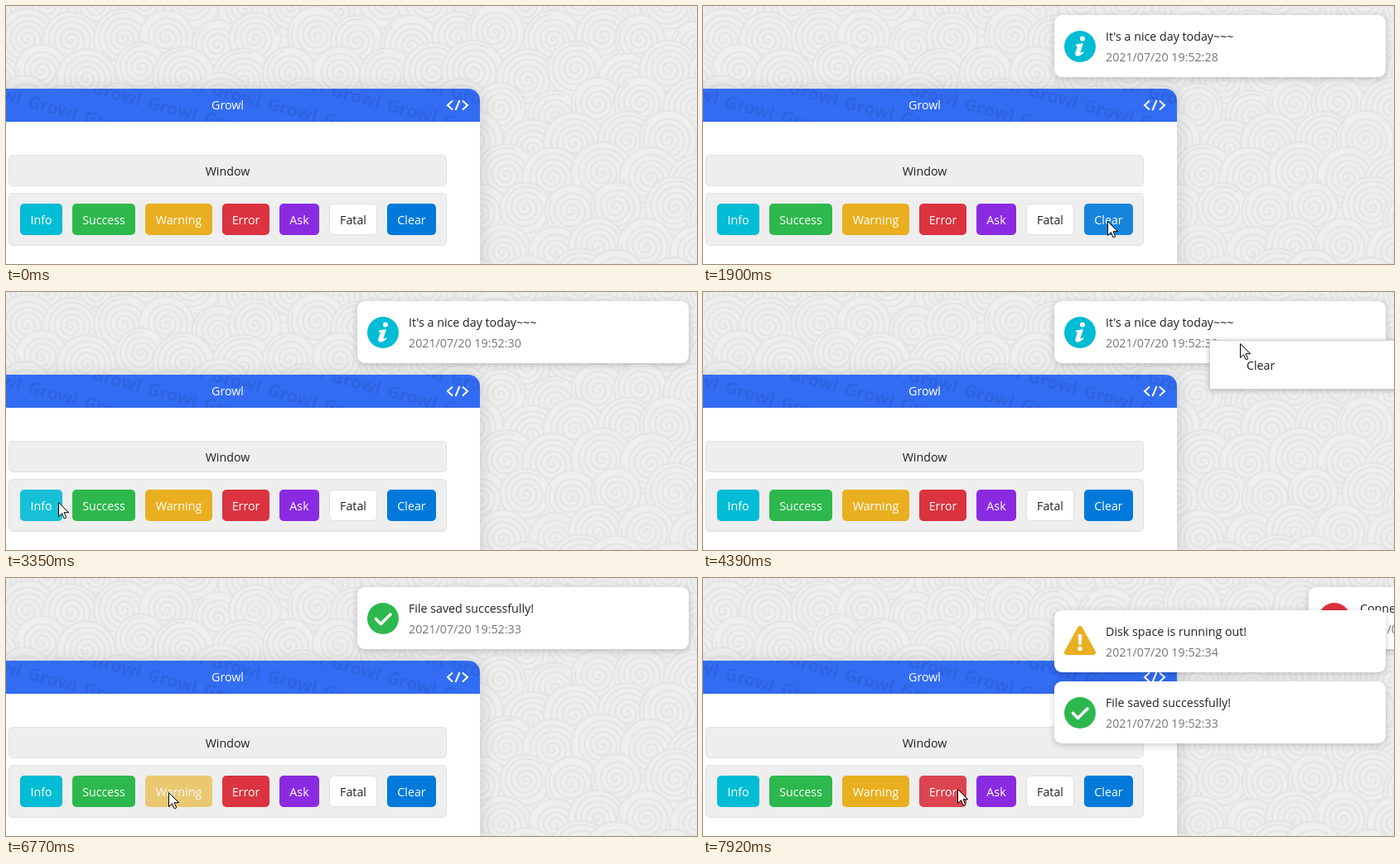
Write an HTML page with a canvas that moves like this. It is 834 by 312 pixels and loops after 7.99 s.

```html
<!DOCTYPE html>
<html lang="en">
<head>
<meta charset="utf-8">
<title>Growl notifications</title>
<style>
html, body { margin: 0; width: 100%; height: 100%; overflow: hidden; background: #eee; }
body { position: relative; font: 14.25px/20px "Open Sans", "Noto Sans", sans-serif; color: #212121; }
body * { position: absolute; box-sizing: border-box; }
svg { overflow: visible; }
#panel { left: -40px; top: 100px; width: 612px; height: 300px; background: #fff; border-radius: 0 14px 0 0;
  box-shadow: 0 2px 20px rgba(0,0,0,.15); overflow: hidden; }
.label { left: 0; width: 535px; text-align: center; }
.box { left: 3px; width: 529px; background: #eee; border: 1px solid #e0e0e0; border-radius: 5px; }
.btn { top: 239px; height: 38px; line-height: 39px; border-radius: 5px; text-align: center; color: #fff; }
.btn.light { color: #212121; border: 1px solid #e0e0e0; line-height: 37px; }
.toast { left: 0; top: 0; width: 400px; height: 75px; background: #fff; border-radius: 9px;
  box-shadow: 0 2px 8px rgba(0,0,0,.2); white-space: nowrap; }
.toast div { left: 62px; top: 15.6px; }
.toast div + div { top: 40.6px; color: #757575; }
.mark { fill: none; stroke: #fff; stroke-width: 3.6; stroke-linecap: round; stroke-linejoin: round; }
#menu { left: 611px; top: 58px; width: 260px; height: 60px; background: #fff; border: 1px solid #d0d0d0;
  box-shadow: 0 1px 6px rgba(0,0,0,.25); }
#menu div { left: 44px; top: 20px; }
</style>
</head>
<body>
<canvas id="swirls" width="834" height="312"></canvas>
<div id="panel"><canvas id="head" width="612" height="40"></canvas></div>
<div class="label" style="top:110px;color:#fff">Growl</div>
<svg style="left:531px;top:112px" width="28" height="16" fill="none" stroke="#fff" stroke-width="2">
  <path d="M8 2.5 2 8l6 5.5M20 2.5 26 8l-6 5.5M16.500 2l-5 12"/>
</svg>
<div class="box" style="top:180px;height:38px"></div>
<div class="label" style="top:190px">Window</div>
<div class="box" style="top:226px;height:64px"></div>
<div id="buttons"></div>
<div id="toasts"></div>
<div id="menu"><div>Clear</div></div>
<svg id="cursor" style="left:0;top:0" width="14" height="21">
  <path d="M.5.5v17l4-3.800 2.700 6.200 2.600-1.100-2.700-6.100h5.600z" fill="#fff" stroke="#000"/>
</svg>
<script>
const $ = id => document.getElementById(id);
const LOOP = 7990, START = 120, STEP = 68.35, LAST_STEP = 114;
const clamp = v => Math.min(1, Math.max(0, v));
const smooth = u => u * u * (3 - 2 * u);
const easeOut = ms => 1 - (1 - clamp(ms / 200)) ** 3;
const move = (el, x, y) => el.style.transform = `translate(${Math.round(x)}px,${Math.round(y)}px)`;

function add(parent, className, html) {
  const el = document.createElement('div');
  el.className = className;
  el.innerHTML = html;
  $(parent).prepend(el);
  return el;
}

function drawSwirls() {
  const c = $('swirls').getContext('2d');
  let seed = 7;
  const rnd = n => (seed = seed * 16807 % 2147483647) / 2147483647 * n;
  const swirl = (x, y, r) => {
    c.beginPath();
    c.arc(x, y, r, 0, 7);
    c.fill();
    c.stroke();
    c.beginPath();
    const turn = rnd(6.28);
    for (let d = 0; d < r - 4; d += .17) {
      const a = d * .9 + turn;
      c.lineTo(x + d * Math.cos(a), y + d * Math.sin(a));
    }
    c.stroke();
  };
  c.fillStyle = '#eee';
  c.strokeStyle = '#e5e5e5';
  c.lineWidth = 2.4;
  for (let row = 0; row < 9; row++)
    for (let x = -20 + row % 2 * 29; x < 870; x += 58)
      swirl(x + rnd(18), row * 42 - 10 + rnd(18), 30 + rnd(8));
}

function drawHead() {
  const c = $('head').getContext('2d');
  c.fillStyle = '#326cf3';
  c.fillRect(0, 0, 612, 40);
  c.translate(173, 8);
  c.rotate(.262);
  c.font = 'bold 21px "Open Sans", "Noto Sans", sans-serif';
  c.textAlign = 'center';
  c.textBaseline = 'middle';
  c.fillStyle = 'rgba(0,0,0,.08)';
  for (let row = -6; row < 6; row++)
    for (let col = -9; col < 9; col++) c.fillText('Growl', col * 70, row * 36);
}

let left = 17;
const buttons = [
  ['Info', 51, '#00bcd4'], ['Success', 76, '#2db84d'], ['Warning', 81, '#e9af20'], ['Error', 57, '#db3340'],
  ['Ask', 48, '#8a2be2'], ['Fatal', 58, '#fff'], ['Clear', 59, '#0079db']
].map(([name, width, color]) => {
  const el = add('buttons', name === 'Fatal' ? 'btn light' : 'btn', name);
  const x = left;
  el.style.cssText = `left:${x}px;width:${width}px;background:${color}`;
  left += width + 12;
  return { name, el, x, width };
});

const disc = (color, mark) => `<circle cx="31" cy="38" r="19" fill="${color}"/>${mark}`;
const kinds = {
  Info: ["It's a nice day today~~~", disc('#00bcd4', '<circle cx="34" cy="28.5" r="3" fill="#fff"/>' +
    '<path d="M26 35.500 35 34 31.500 45q0 1.500 3.500-1l.5 1.500q-4.500 4.500-8 4-3-.5-2-4l2.500-8h-2z" fill="#fff"/>')],
  Success: ['File saved successfully!', disc('#2db84d', '<path class="mark" d="M22.500 38.500l6 6L40 33"/>')],
  Warning: ['Disk space is running out!',
    '<path d="M31 22 47 51H15z" fill="#e9af20" stroke="#e9af20" stroke-width="6" stroke-linejoin="round"/>' +
    '<path d="M28.500 29h5l-1 13h-3z" fill="#fff"/><circle cx="31" cy="46.500" r="2.700" fill="#fff"/>'],
  Error: ['Connection failed! Check your network!',
    disc('#db3340', '<path class="mark" d="M24.500 31.500l13 13m0-13l-13 13"/>')]
};

const clicks = [
  ['Info', 1003], ['Clear', 2300], ['Info', 3000], ['Success', 5780], ['Warning', 6880], ['Error', 7895]
];
const MENU_OPEN = 4080, MENU_CLICK = 4760, PRESS = 135;
const clears = [2300, MENU_CLICK];

const toasts = clicks.filter(([name]) => kinds[name]).map(([name, start]) => {
  const [title, icon] = kinds[name];
  const second = Math.floor(27.3 + start / 1000);
  const el = add('toasts', 'toast',
    `<svg width="62" height="75">${icon}</svg><div>${title}</div><div>2021/07/20 19:52:${second}</div>`);
  return { el, start, end: clears.find(t => t > start) || LOOP };
}).reverse();

// Pointer moves: from time, to time, x, y
const moves = [
  [120, 880, 26, 250], [1430, 2040, 562, 262], [2040, 2235, 490, 258], [2460, 2767, 35, 265],
  [3220, 4050, 602, 49], [4110, 4350, 648, 62], [4430, 4520, 660, 90],
  [5190, 5438, 125, 246], [6140, 6500, 196, 259], [7430, 7700, 307, 255]
];

function pointer(t) {
  let x = 402, y = 289;
  for (const [from, to, tx, ty] of moves) {
    const u = smooth(clamp((t - from) / (to - from)));
    x += (tx - x) * u;
    y += (ty - y) * u;
  }
  return [x, y];
}

const began = performance.now();

function draw() {
  const time = (performance.now() - began) % LOOP;
  // The screen is refreshed in steps
  const t = START + STEP * Math.min(LAST_STEP, Math.floor((time - START) / STEP));
  const [x, y] = pointer(t);
  const visible = t >= START;
  $('cursor').style.opacity = +visible;
  move($('cursor'), x, y);

  for (const b of buttons) {
    const hover = visible && x >= b.x && x < b.x + b.width && y >= 239 && y < 277;
    const down = clicks.some(([name, at]) => name === b.name && t < at && t >= at - PRESS);
    b.el.style.opacity = down ? .6 : hover ? .9 : 1;
  }

  let top = 11;
  for (const { el, start, end } of toasts) {
    const shown = t >= start && t < end;
    el.style.opacity = +shown;
    if (!shown) continue;
    move(el, 824 - 400 * easeOut(t - start), top);
    top += 86 * easeOut(t - start + 8);
  }

  $('menu').style.opacity = t < MENU_OPEN ? 0 : 1 - clamp((t - MENU_CLICK) / 140);
  requestAnimationFrame(draw);
}

drawSwirls();
drawHead();
draw();
</script>
</body>
</html>
```
